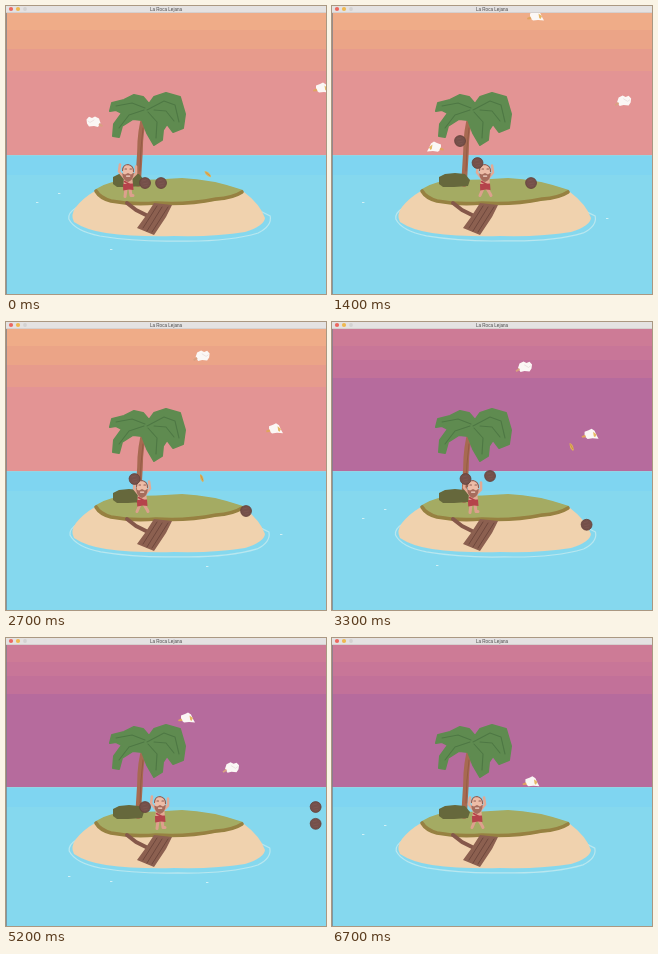
An HTML page that plays this animation: 320 px wide and 288 px high, repeating every 6.8 s.

```html
<!DOCTYPE html>
<html lang="es">
<head>
<meta charset="utf-8">
<style>
html, body { margin: 0; width: 100%; height: 100%; overflow: hidden; background: #85d8ee; }
svg { display: block; width: 100vw; height: 100vh; }
.line { fill: none; stroke-linecap: round; stroke-linejoin: round; }
</style>
</head>
<body>
<svg viewBox="0 0 320 288" preserveAspectRatio="none">
  <defs>
    <g id="coconut">
      <path d="M-5.4 -.5Q-5 -5 0 -5.4Q5.2 -5 5.5 0Q5 5.2 0 5.5Q-5.2 5 -5.4 -.5Z" fill="#75504a" stroke="#624039" stroke-width=".8"/>
      <path class="line" d="M-2.5 -2L1 -3M-2 1L2.5 0M-1 3.2L2 2.6" stroke="#825c54" stroke-width=".6"/>
    </g>
    <g id="fish">
      <path d="M-3.6 -2.6Q0 -3.3 3 1.8L2.8 3.2Q-2 2.2 -3.6 -2.6Z" fill="#e0b257"/>
      <path class="line" d="M-2 -1.4L1.6 1.4" stroke="#c98d49" stroke-width=".8"/>
    </g>
    <g id="gull0">
      <path d="M-5 -3.5L-1 -5.5L2 -4L5 -5.2L7.5 -2.5L7 1.5L5 4.5L0 4L-4 5L-6.5 1Z" fill="#fbf7f5"/>
      <path d="M-5.5 1L-9 3.6L-8 5L-4.5 3Z" fill="#d8a080"/>
      <path class="line" d="M0 -2L4 .5L6 -1" stroke="#e5d9d8" stroke-width=".7"/>
    </g>
    <g id="gull1">
      <path d="M-6 -2.5L-2 -4L1 -5.5L4 -3.5L6 1L8 4.5L2 4L-3 4.6L-6 2Z" fill="#fbf7f5"/>
      <path d="M-5.5 .5L-9 2L-8.4 3.4L-4.5 3Z" fill="#e0a45e"/>
      <path d="M2.5 -2.5L6 .2L4.5 3L3.2 2Z" fill="#e6b865"/>
    </g>
  </defs>

  <g id="sky"></g>
  <rect y="149" width="320" height="139" fill="#85d8ee"/>
  <rect y="149" width="320" height="20" fill="#7fd5f1"/>
  <rect y="149" width="320" height="1" fill="#92d5e5"/>
  <g id="sparkles" fill="#d8f3f7"></g>

  <path id="foam" class="line" d="M70 202Q62 207 63 213Q69 225 94 230Q130 236 172 235Q222 236 252 227Q266 220 264 210L256 206" stroke="#b9e7ef" stroke-width="1.2"/>
  <path d="M89 185Q77 192 70 201Q64 209 68 216Q80 224 100 227Q130 231 168 230Q210 231 239 226Q258 220 259 212Q254 198 238 186Z" fill="#f0d2ae"/>
  <path d="M90 183Q104 174 125 174Q150 174 176 172Q205 173 237 184Q228 193 207 195Q180 199 148 198Q112 200 97 193Z" fill="#a4ab63"/>
  <path class="line" d="M90 185Q94 192 105 195Q126 199 150 197Q181 199 210 193Q227 192 236 186" stroke="#978141" stroke-width="3.6"/>

  <path class="line" d="M121 197L130 204L144 211" stroke="#85584a" stroke-width="4"/>
  <path d="M148 197L166 199L160 211L148 229L131 222L139 211Z" fill="#8c6050"/>
  <path class="line" d="M151 200L137 222M156 201L141 225M162 201L146 226" stroke="#6f483d" stroke-width="1"/>

  <path class="line" d="M139 108Q134 125 134 145L132 178" stroke="#a76a51" stroke-width="5.6"/>
  <path class="line" d="M137 122L135 142L134 165" stroke="#935944" stroke-width=".9"/>
  <path d="M107 178L107 171L113 168L123 167L133 168L138 174L136 180L122 181L111 181Z" fill="#66683c"/>
  <path d="M104 105L106 97L118 94L128 89L137 91L143 98L148 91L160 87L174 91L179 108L177 122L167 126L161 118L157 124L156 134L148 139L141 127L136 114L127 113L116 120L113 131L107 130L108 118L116 107L110 104Z" fill="#5f8b50" stroke="#5f8b50" stroke-width="2" stroke-linejoin="round"/>
  <path class="line" d="M110 100L126 97L139 102M113 122L123 109L138 104M141 104L158 95L169 99L173 116M142 106L151 116L150 132M148 104L160 105L168 115" stroke="#4e7844" stroke-width="1.1"/>

  <g id="gulls"></g>
  <g id="man">
    <path id="legs" class="line" stroke="#dda08d" stroke-width="3"/>
    <path d="M-4 -6L4 -6L5 6L-4.5 6Z" fill="#e3aa95"/>
    <path id="arms" class="line" stroke="#e3aa95" stroke-width="2.6"/>
    <path d="M-5 4.5L5 4L5.5 10.5L1 10L-4.8 11Z" fill="#b5434b"/>
    <path d="M-5.5 -9Q-5 -15 0 -15Q5.5 -14 5.5 -8Q5 -2 0 -1Q-5 -2 -5.5 -9Z" fill="#edbca7"/>
    <path d="M-5.8 -6L-3 -5L0 -6.5L3 -5L5.8 -7Q5.5 1 0 2.5Q-5 1 -5.8 -6Z" fill="#a66c5c"/>
    <path class="line" d="M-5.5 -9Q-5 -15 0 -15Q5.5 -14 5.5 -8M-3 -10.5L-1.5 -10.5M2 -10.5L3.5 -10.5" stroke="#8e5c52" stroke-width="1.1"/>
    <path class="line" d="M-1.5 -3.4L1.8 -3.4" stroke="#f3d6c9" stroke-width="1.1"/>
    <path class="line" d="M-3.5 2L3.5 6" stroke="#b5434b" stroke-width="1.5"/>
  </g>
  <g id="items"></g>

  <rect y="7" width="1" height="281" fill="#7b8288" opacity=".75"/>
  <rect width="320" height="7" fill="#e4e2e2"/>
  <rect y="6.5" width="320" height=".5" fill="#c5bdbb"/>
  <circle cx="5" cy="3" r="2.1" fill="#ec675f"/>
  <circle cx="12" cy="3" r="2.1" fill="#efb84f"/>
  <circle cx="19" cy="3" r="1.9" fill="#d3d2d1"/>
  <text x="160" y="5" text-anchor="middle" font-family="'Liberation Sans', Arial, sans-serif" font-size="4.6" fill="#484848">La Roca Lejana</text>
</svg>

<script>
const LOOP = 6800, STEP = 100, DUSK = 2800;
const byId = id => document.getElementById(id);
const svgNode = (parent, tag, attrs = {}) => {
  const node = document.createElementNS('http://www.w3.org/2000/svg', tag);
  for (const key in attrs) node.setAttribute(key, attrs[key]);
  return parent.appendChild(node);
};
const place = (node, x, y, extra = '') => node.setAttribute('transform', `translate(${x} ${y}) ${extra}`);
const show = (node, on) => node.setAttribute('visibility', on ? 'visible' : 'hidden');

// Piecewise linear path through [time, ...values] points.
function along(points, t) {
  let i = 1;
  while (i < points.length - 1 && t > points[i][0]) i++;
  const a = points[i - 1], b = points[i];
  const k = Math.max(0, Math.min(1, (t - a[0]) / (b[0] - a[0])));
  return a.slice(1).map((v, n) => v + (b[n + 1] - v) * k);
}

// Accelerating drop that passes height y at time t0 and rests on the grass.
const drop = (x, y, t0) => t => {
  const s = (t - t0) / 1000;
  return [x, Math.min(177, y + 130 * s + 160 * s * s)];
};
const track = (...points) => t => along(points, t);
const drift = (x, y, vx, vy, t0 = 0) => t => [x + vx * (t - t0) / 1000, y + vy * (t - t0) / 1000];

const manX = track([0, 122], [1400, 153], [2700, 136], [3300, 141], [4400, 159], [5200, 154], [6700, 145]);
const manAt = t => [manX(t)[0], 173.5];
const held = t => [manX(t)[0] - 7.5, 157];

const actors = [
  { shape: 'coconut', from: 0, to: 700, at: () => [139, 177] },
  { shape: 'coconut', from: 0, to: 3400, at: track([0, 155, 177], [600, 155, 177], [1400, 199, 177], [2100, 222, 180], [2700, 240, 189], [3400, 257, 205]) },
  { shape: 'coconut', from: 700, to: 4200, at: held },
  { shape: 'coconut', from: 1200, to: 2000, at: drop(128, 135, 1400) },
  { shape: 'coconut', from: 3100, to: 4300, at: drop(158, 154, 3300) },
  { shape: 'coconut', from: 4300, to: 5300, at: drift(180, 151, 162, 22.5, 4400) },
  { shape: 'coconut', from: 4300, to: 5300, at: drift(180, 167, 162, 23.5, 4400) },
  { shape: 'coconut', from: 5000, to: 6000, at: drop(139, 169, 5200) },
  { shape: 'fish', from: 0, to: 1300, at: drift(202, 168, 73, -52) },
  { shape: 'fish', from: 2200, to: 3500, at: drift(196, 156, 73, -52, 2700) }
];
for (const actor of actors) actor.node = svgNode(byId('items'), 'use', { href: '#' + actor.shape });

const gulls = [
  { to: 1900, flip: -1, at: drift(88, 116, 10.7, 17.9) },
  { to: LOOP, flip: 1, at: drift(316, 82, -17.4, 9.2) },
  { to: 6000, flip: 1, at: drift(204, 10, -6.05, 18.4, 1400) }
];
for (const gull of gulls) gull.node = svgNode(byId('gulls'), 'use');

const palettes = {
  day: [[7, '#efac88'], [24, '#eba487'], [43, '#e79b8c'], [65, '#e39494']],
  dusk: [[7, '#cd7b96'], [24, '#c87698'], [38, '#c27199'], [56, '#b66b9d']]
};
const skies = {};
for (const name in palettes) {
  skies[name] = svgNode(byId('sky'), 'g');
  for (const [y, fill] of palettes[name]) svgNode(skies[name], 'rect', { y, width: 320, height: 150 - y, fill });
}

const sparkles = [[30, 196], [104, 243], [200, 244], [274, 212], [52, 187], [62, 238]].map(([x, y]) =>
  svgNode(byId('sparkles'), 'rect', { x, y, width: 2.4, height: 0.9 }));

function draw(time) {
  const t = Math.floor((time % LOOP) / STEP) * STEP;
  const beat = t / STEP;

  show(skies.day, t < DUSK);
  show(skies.dusk, t >= DUSK);
  sparkles.forEach((node, i) => show(node, (beat + i * 3) % 11 < 4));
  const swell = 0.995 + 0.007 * Math.cos(t / 700);
  byId('foam').setAttribute('transform', `translate(163 218) scale(${swell}) translate(-163 -218)`);

  for (const { node, from, to, at, shape } of actors) {
    const on = t >= from && t < to;
    show(node, on);
    if (on) place(node, ...at(t), shape === 'fish' ? `rotate(${(t % 700) / 20})` : '');
  }
  gulls.forEach(({ node, to, flip, at }, i) => {
    show(node, t < to);
    node.setAttribute('href', '#gull' + (Math.floor(beat / 4 + i) % 2));
    place(node, ...at(t), `scale(${flip} 1)`);
  });

  const stride = Math.floor(beat / 2) % 2;
  byId('legs').setAttribute('d', stride ? 'M-2 9L-5 16M2 9L5 14L6 16' : 'M-2 9L-3 17M2 9L3 16L5 16');
  byId('arms').setAttribute('d', stride ? 'M-4 -2L-8 -7L-7 -14M4 -2L8 -7L7 -14' : 'M-4 -2L-9 -8L-8 -15M4 -2L8 -6L8 -13');
  place(byId('man'), ...manAt(t));
}

const start = performance.now();
function tick() {
  draw(performance.now() - start);
  requestAnimationFrame(tick);
}
tick();
</script>
</body>
</html>
```
